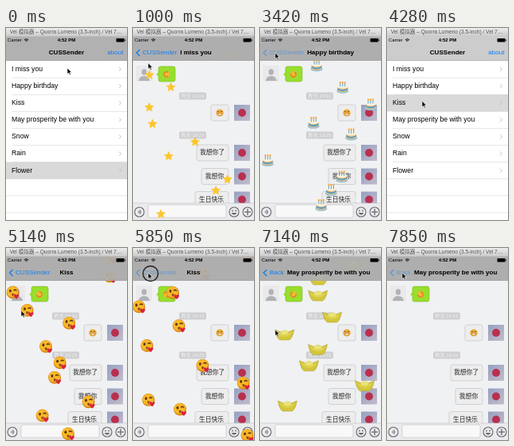
Animation of 152x240 px, one loop 7990 ms. Source, as an HTML page with a canvas:

```html
<!DOCTYPE html>
<html lang="en">
<head>
<meta charset="utf-8">
<title>Message effects</title>
<style>
html, body { margin: 0; width: 100%; height: 100%; overflow: hidden; }
canvas { display: block; width: 152px; height: 240px; }
</style>
</head>
<body>
<canvas id="stage"></canvas>
<script>
const W = 152, H = 240, LOOP = 7990, STEPS = 56, NAV = 41, ROW = 21.1;
const FALL = 52, GAP = .42; // pixels per step, steps between drops
const FONT = '"Liberation Sans", "Noto Sans CJK SC", "Noto Sans CJK", sans-serif';
const BLUE = '#1580f0', ICON = '#66696e';
const canvas = document.getElementById('stage');
const c = canvas.getContext('2d');
const scale = Math.max(1, window.devicePixelRatio || 1);
canvas.width = W * scale;
canvas.height = H * scale;

const rows = ['I miss you', 'Happy birthday', 'Kiss', 'May prosperity be with you', 'Snow', 'Rain', 'Flower'];

// The chat opens at step `push` and closes at step `pop`.
const scenes = [
  { push: 1, pop: 11, back: 'CUSSender', draw: star, count: 22 },
  { push: 16, pop: 24, back: 'CUSSender', draw: cake, count: 19 },
  { push: 30, pop: 41, back: 'CUSSender', draw: kiss, count: 26, ring: true },
  { push: 46, pop: 55, back: 'Back', draw: ingot, count: 10 }
];

const clamp = v => Math.min(1, Math.max(0, v));
const ease = u => 1 - (1 - clamp(u)) ** 3;
const mix = (a, b, u) => a + (b - a) * u;
const random = n => {
  const v = Math.sin(n * 12.9898) * 43758.5453;
  return v - Math.floor(v);
};

function text(s, x, y, size, color = '#000', align = 'left', weight = 'normal') {
  c.font = `${weight} ${size}px ${FONT}`;
  c.textAlign = align;
  c.textBaseline = 'middle';
  c.fillStyle = color;
  c.fillText(s, x, y);
}

function rect(x, y, w, h, fill) {
  c.fillStyle = fill;
  c.fillRect(x, y, w, h);
}

function round(x, y, w, h, r, fill, edge) {
  c.beginPath();
  c.roundRect(x, y, w, h, r);
  c.fillStyle = fill;
  c.fill();
  if (edge) { c.strokeStyle = edge; c.lineWidth = .6; c.stroke(); }
}

function oval(x, y, rx, ry, fill) {
  c.beginPath();
  c.ellipse(x, y, rx, ry, 0, 0, 7);
  c.fillStyle = fill;
  c.fill();
}

function line(points, color, width = 1) {
  c.beginPath();
  points.forEach(p => c.lineTo(...p));
  c.strokeStyle = color;
  c.lineWidth = width;
  c.stroke();
}

function arc(x, y, r, from, to, color, width) {
  c.beginPath();
  c.arc(x, y, r, from, to);
  c.strokeStyle = color;
  c.lineWidth = width;
  c.stroke();
}

function shape(d, fill, edge, width = .5) {
  const p = new Path2D(d);
  c.fillStyle = fill;
  c.fill(p);
  if (edge) { c.strokeStyle = edge; c.lineWidth = width; c.stroke(p); }
}

function at(x, y, paint) {
  c.save();
  c.translate(x, y);
  paint();
  c.restore();
}

function star() {
  c.beginPath();
  for (let i = 0; i < 10; i++) {
    const r = i % 2 ? 3 : 6.5, a = i * Math.PI / 5;
    c.lineTo(r * Math.sin(a), -r * Math.cos(a));
  }
  c.fillStyle = '#fbc62d';
  c.fill();
}

function cake() {
  oval(0, 4.5, 7.5, 3, '#9cbfd2');
  shape('M-6.5 -1V4Q0 8 6.5 4V-1Z', '#e6bd80');
  shape('M-6.5 1Q0 5 6.5 1V2.8Q0 7 -6.5 2.8Z', '#4f9cc6');
  oval(0, -1, 6.5, 2.6, '#fbf3df');
  for (const x of [-3, 0, 3]) {
    line([[x, -1], [x, -5]], '#5c9fd0', 1);
    oval(x, -6, 1, 1.3, '#f2a632');
  }
}

function kiss() {
  c.scale(1.18, 1.18);
  oval(0, 0, 6.7, 6.7, '#d98412');
  oval(-.3, -.6, 6, 5.8, '#f8b829');
  oval(-2.6, -1.6, 1.2, 1.6, '#5d3211');
  line([[.8, -2], [2.6, -2.9], [4.2, -1.8]], '#5d3211', 1.2);
  line([[-1, 1.5], [.8, 2], [-.4, 3], [.8, 4]], '#7b3510');
  shape('M4 7C-1 3 2 .5 4 3C6 .5 9 3 4 7Z', '#d9233a');
}

function ingot() {
  shape('M-12 -5Q-7 -3 -5 -2Q0 -6 5 -2Q7 -3 12 -5Q10 6 6 8H-6Q-10 6 -12 -5Z', '#d3c53c', '#aa9d2c');
  oval(0, -1, 5, 3.2, '#ebe37a');
  shape('M-10 -3Q0 5 10 -3Q7 4 0 4Q-7 4 -10 -3Z', '#ded34f');
}

function chevron(x, y, dir, color, size = 2.5, width = 1) {
  line([[x, y - size], [x + dir * size, y], [x, y + size]], color, width);
}

function drawList(selected, glow) {
  rect(0, NAV, W, H, '#fff');
  c.globalAlpha = glow;
  rect(0, NAV + selected * ROW, W, ROW, '#d9d9d9');
  c.globalAlpha = 1;
  for (let i = 0; i < 9; i++) {
    const y = NAV + (i + 1) * ROW;
    rect(i < 6 ? 7 : 0, y - .25, W, .5, '#cfcfd3');
    if (!rows[i]) continue;
    text(rows[i], 7, y - ROW / 2, 8.7);
    chevron(142, y - ROW / 2, 1, '#c3c3c8');
  }
}

function avatar(y) {
  const g = c.createLinearGradient(127, y, 147, y + 20);
  g.addColorStop(0, '#96a0c2');
  g.addColorStop(1, '#c3bccb');
  rect(127, y, 20, 20, g);
  oval(137, y + 10, 5, 5, '#b83050');
}

function bubble(x, y, label) {
  round(x, y, 120 - x, 20, 2.5, '#ededee', '#bdbdbf');
  shape(`M119.7 ${y + 7}l3 3l-3 3Z`, '#ededee');
  if (label) text(label, (x + 119) / 2, y + 10, 7.8, '#222', 'center');
  avatar(y);
}

function drawInputBar() {
  rect(0, 219, W, 21, '#ebebed');
  rect(0, 218.7, W, .5, '#bbbbbe');
  round(19, 221, 98, 16, 2, '#f8f8f8', '#bcbcbf');
  for (const x of [8, 127, 144]) arc(x, 230, 6, 0, 7, ICON, 1.1);
  for (const r of [1, 2.5, 4]) arc(5.8, 230, r, -.8, .8, ICON, .9);
  for (const x of [125, 129]) oval(x, 228.5, .9, .9, ICON);
  shape('M123.5 231H130.5Q127 236 123.5 231Z', ICON);
  line([[140, 230], [148, 230]], ICON, 1.3);
  line([[144, 226], [144, 234]], ICON, 1.3);
}

function drawDrops({ push, count, draw }, k) {
  for (let i = 0; i < count; i++) {
    const seed = push * 40 + i;
    const y = (k - push - i * GAP) * FALL - 10 - random(seed + .5) * 12;
    if (y > -10 && y < H + 10) at(4 + random(seed) * 144, y, draw);
  }
}

function drawChat(scene, k) {
  rect(0, NAV, W, H, '#f0f1f3');
  rect(4, 47, 20, 20, '#e9e9eb');
  oval(14, 55, 3.2, 3.8, '#b0b2b5');
  shape('M7 66Q8 60 14 60Q20 60 21 66Z', '#b0b2b5');
  round(32, 48, 21, 19, 2.5, '#98de2c', '#79b62b');
  shape('M32.2 55l-3 3l3 3Z', '#98de2c');
  oval(42, 58, 4, 4, '#efbb35');
  arc(42, 58, 3.2, k, k + 4.7, '#e27426', 1.2);

  for (const [y, label] of [[85, '昨天 10:13'], [134, '昨天 10:23']]) {
    round(58, y - 4.5, 34, 9, 2, '#cfcfd2');
    text(label, 75, y + .3, 6, '#f4f4f4', 'center');
  }
  bubble(98, 96);
  oval(109, 106, 4.8, 4.5, '#e9ad3c');
  for (const x of [107, 111]) line([[x - 1, 105], [x, 104], [x + 1, 105]], '#754012', .8);
  shape('M106 107H112Q109 111.5 106 107Z', '#fff', '#a4561c');
  bubble(80, 146, '我想你了');
  bubble(86, 175.5, '我想你');
  bubble(78, 204.5, '生日快乐');
  drawInputBar();
  drawDrops(scene, k);
}

function drawNav(scene, title, p, shade, pressed) {
  rect(0, 10, W, NAV - 10, `rgba(${shade},${shade},${shade + 1},.92)`);
  rect(0, NAV - .5, W, .5, '#9f9fa1');
  text('Carrier', 2, 15.3, 5.8);
  for (const r of [1, 2.4, 3.8]) arc(25.5, 17.5, r, -2.35, -.79, '#000', .8);
  text('4:52 PM', 76, 15.3, 6, '#000', 'center', 'bold');
  round(138.5, 13, 10, 4.6, .8, '#000');
  rect(149, 14.4, .8, 1.8, '#000');

  c.globalAlpha = 1 - p;
  text('CUSSender', 76 - p * 45, 31, 8.1, '#000', 'center', 'bold');
  text('about', 147.5, 31, 8.1, BLUE, 'right');
  c.globalAlpha = p * (pressed ? .4 : 1);
  chevron(8.5, 31, -1, BLUE, 4, 1.4);
  text(scene.back, 12 + (1 - p) * 40, 31, 8.1, BLUE);
  // The title is centred unless the back label pushes it aside.
  const backEnd = 12 + c.measureText(scene.back).width;
  c.font = `bold 8.1px ${FONT}`;
  const x = Math.max(W / 2, backEnd + 4 + c.measureText(title).width / 2);
  c.globalAlpha = p;
  text(title, x + (1 - p) * 60, 31, 8.1, '#000', 'center', 'bold');
  c.globalAlpha = 1;
}

function drawWindowBar() {
  const g = c.createLinearGradient(0, 0, 0, 10.5);
  g.addColorStop(0, '#ececec');
  g.addColorStop(1, '#cbcbcb');
  rect(0, 0, W, 10.5, g);
  text('Vel 模拟器 – Quorra Lumeno (3.5-inch) / Vel 7…', 75, 5.4, 6.6, '#555', 'center');
}

// The pointer goes from row to back button while a chat is open, then to the next row.
function pointerAt(scene, index, k) {
  const rowY = i => 49 + i * ROW, x = 44, backX = 19, backY = 31;
  if (k < scene.push) return [77, 50];
  if (k < scene.pop) {
    const u = clamp((k - scene.push) / (scene.pop - scene.push - 1));
    return [mix(x, backX, ease((k - scene.push) / 4)), mix(rowY(index), backY, u ** 3)];
  }
  const u = ease((k - scene.pop) / 4);
  return [mix(backX, x, u), mix(backY, rowY(index + 1), u)];
}

function drawPointer(x, y, ring) {
  at(x, y, () => {
    if (ring) arc(3, 1, 9.5, 0, 7, '#222', 1.4);
    shape('M0 0V7.5L1.8 6L3 8.8L4.3 8.2L3.1 5.5H5.5Z', '#000', '#fff', .6);
  });
}

function render(k) {
  const index = Math.max(0, scenes.filter(s => s.push <= k).length - 1);
  const scene = scenes[index];
  const p = k < scene.pop ? ease((k - scene.push) / 3) : 1 - ease((k - scene.pop) / 3);
  const sincePop = k - Math.max(0, ...scenes.map(s => s.pop).filter(v => v <= k));
  const shade = mix(Math.min(205, 176 + sincePop * 7), 174, p);

  c.setTransform(scale, 0, 0, scale, 0, 0);
  if (p < 1) {
    const selected = k < scene.push ? rows.length - 1 : index;
    const glow = k < scene.pop ? 1 : clamp(1 - (k - scene.pop - 4) / 2);
    at(-p * 45, 0, () => drawList(selected, glow));
    rect(0, NAV, W, H, `rgba(0,0,0,${p * .1})`);
  }
  if (p > 0) at((1 - p) * W, 0, () => drawChat(scene, k));
  drawNav(scene, rows[index], p, shade, k >= scene.pop);
  drawWindowBar();
  drawPointer(...pointerAt(scene, index, k), scene.ring && k === scene.pop);
}

function tick() {
  render(Math.floor((performance.now() % LOOP) / LOOP * STEPS + .05) % STEPS);
  requestAnimationFrame(tick);
}
tick();
</script>
</body>
</html>
```
